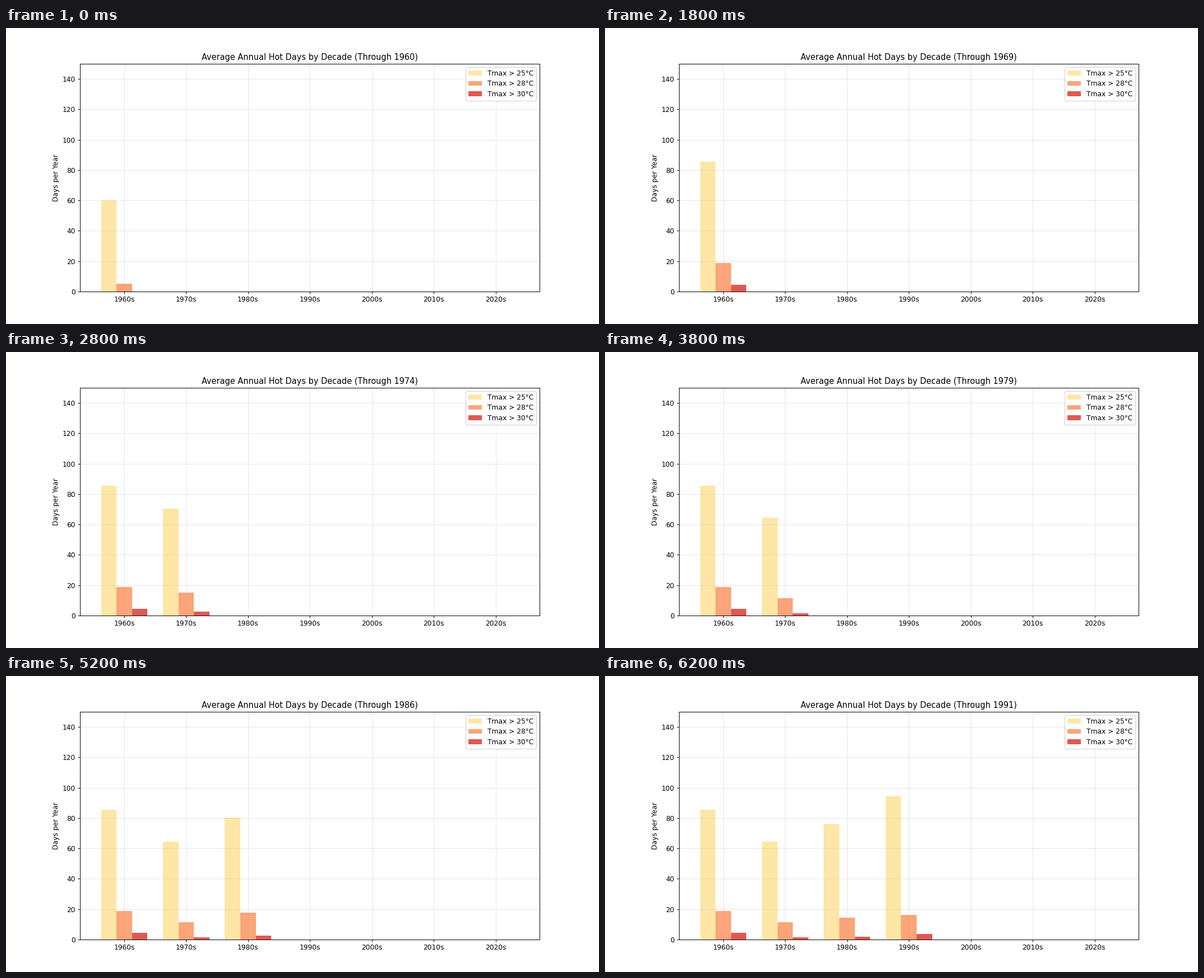
These frames come from a looping animation (1058x529 px, 6.4 s). A matplotlib script:

```python
import numpy as np
import matplotlib.pyplot as plt
from matplotlib.animation import FuncAnimation

plt.rcParams["font.family"] = "DejaVu Sans"

FIRST_YEAR, LAST_YEAR = 1960, 1991
DECADES = np.arange(1960, 2030, 10)
BAR_WIDTH = 0.25
SERIES = [
    ("Tmax > 25°C", "#fee090"),
    ("Tmax > 28°C", "#fc8d59"),
    ("Tmax > 30°C", "#d73027"),
]

# Running means (one per threshold) after a number of years of each decade
KEY_MEANS = {
    1960: {1: (60, 5, 0), 4: (86.4, 14.6, 2.6), 10: (85.4, 18.9, 4.2)},
    1970: {5: (70.2, 15, 2.6), 10: (64.4, 11.4, 1.3)},
    1980: {7: (80.2, 17.5, 2.6), 10: (75.9, 14.4, 1.9)},
    1990: {1: (97, 18, 5), 2: (94.5, 16, 3.6)},
}


def running_means(decade, year):
    """Totals grow linearly between keys; dividing by the years gives the mean."""
    n = min(year - decade + 1, 10)
    if n < 1 or decade not in KEY_MEANS:
        return np.zeros(len(SERIES))
    counts = [0, *KEY_MEANS[decade]]
    means = np.array([(0, 0, 0), *KEY_MEANS[decade].values()])
    return np.array([np.interp(n, counts, counts * m) / n for m in means.T])


fig, ax = plt.subplots(figsize=(12, 6), dpi=88.16667)
fig.subplots_adjust(top=0.879)
x = np.arange(len(DECADES))
groups = [
    ax.bar(x + (i - 1) * BAR_WIDTH, np.zeros(len(x)), BAR_WIDTH,
           color=color, alpha=0.8, label=label)
    for i, (label, color) in enumerate(SERIES)
]

half = 1.5 * BAR_WIDTH
pad = 0.05 * (x[-1] + 2 * half)
ax.set_xlim(-half - pad, x[-1] + half + pad)
ax.set_ylim(0, 150)
ax.set_xticks(x, [f"{d}s" for d in DECADES])
ax.set_ylabel("Days per Year")
ax.grid(True, alpha=0.3)
ax.legend(loc="upper right", labelspacing=0.44)
title = ax.set_title("", fontsize=11.9)


def update(step):
    year = FIRST_YEAR + step
    for i, decade in enumerate(DECADES):
        for bars, height in zip(groups, running_means(decade, year)):
            bars[i].set_height(height)
    title.set_text(f"Average Annual Hot Days by Decade (Through {year})")
    return [title, *(bar for bars in groups for bar in bars)]


anim = FuncAnimation(fig, update, frames=LAST_YEAR - FIRST_YEAR + 1,
                     interval=200, repeat=True, repeat_delay=0, blit=False)
plt.show()
```
